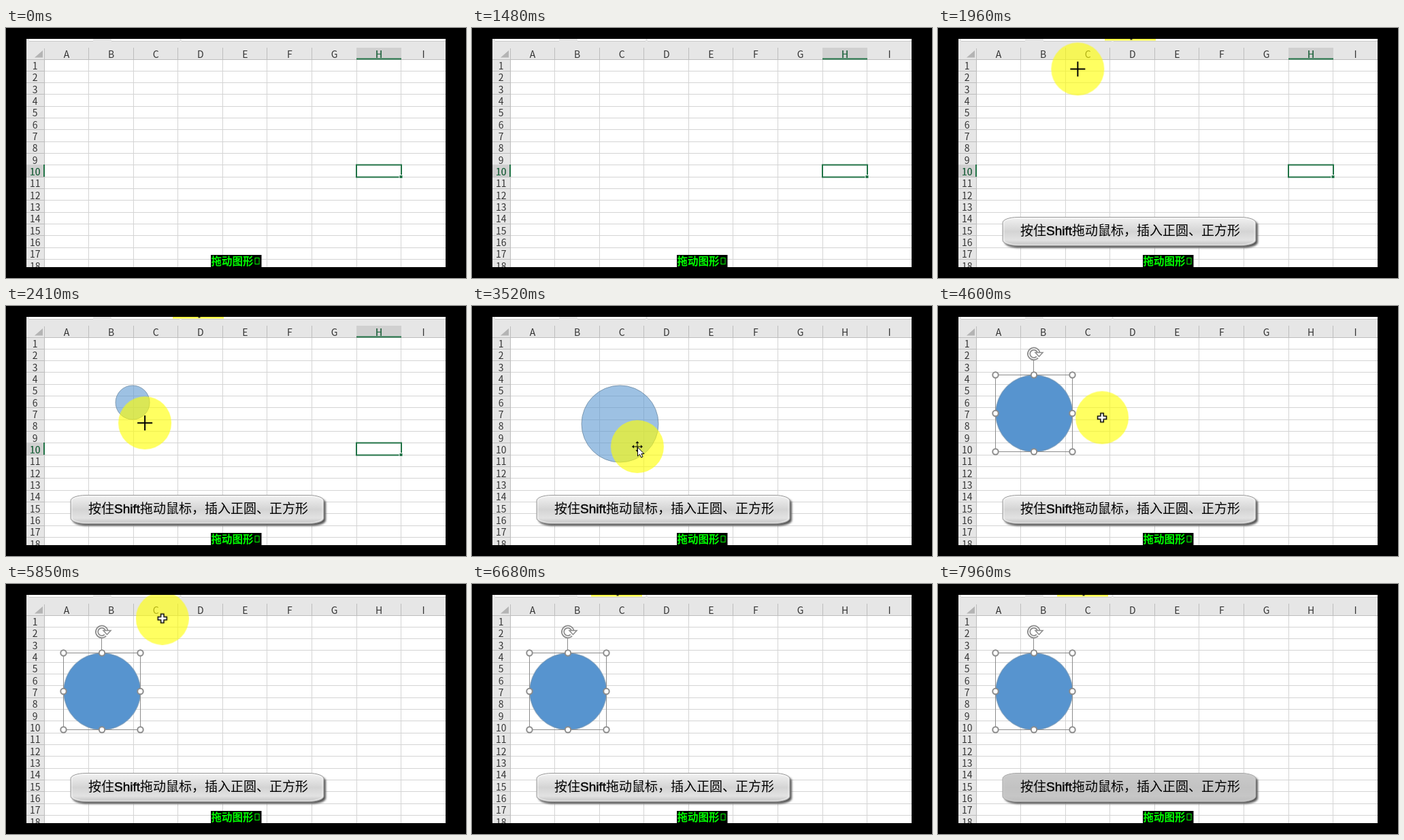
An HTML page that plays this animation: 676 px wide and 368 px high, repeating every 7.99 s.

```html
<!DOCTYPE html>
<html lang="zh">
<head>
<meta charset="utf-8">
<title>拖动图形</title>
<style>
  html, body { margin: 0; width: 100%; height: 100%; overflow: hidden; background: #000; }
  svg { display: block; width: 676px; height: 368px; }
  text { font-family: "Liberation Sans", "Noto Sans CJK SC", "Noto Sans CJK", sans-serif; }
  .label { font: 14px "Noto Sans CJK SC", "Noto Sans CJK", "Open Sans", sans-serif; fill: #333; text-anchor: middle; }
  .label.on { fill: #217346; }
  .note { font-size: 19px; font-weight: 300; }
  .note tspan { font-weight: 400; stroke: #000; stroke-width: .4px; }
</style>
</head>
<body>
<svg id="stage" viewBox="0 0 676 368">
  <defs>
    <clipPath id="window"><rect x="30" y="16" width="616" height="336"/></clipPath>
    <linearGradient id="silver" x1="0" y1="0" x2="0" y2="1">
      <stop offset="0" stop-color="#f2f2f2"/>
      <stop offset=".5" stop-color="#d4d4d4"/>
      <stop offset=".8" stop-color="#e2e2e2"/>
      <stop offset="1" stop-color="#c0c0c0"/>
    </linearGradient>
    <filter id="soft" x="-5%" y="-20%" width="110%" height="150%"><feGaussianBlur stdDeviation="1.5"/></filter>
  </defs>
</svg>
<script>
const LOOP = 7990;
const GREEN = '#217346';
const GRAY = '#8c8c8c';
const stage = document.getElementById('stage');

function add(parent, tag, attrs = {}, text) {
  const node = document.createElementNS('http://www.w3.org/2000/svg', tag);
  for (const key in attrs) node.setAttribute(key, attrs[key]);
  if (text) node.textContent = text;
  parent.append(node);
  return node;
}
const rect = (parent, x, y, width, height, fill, more) =>
  add(parent, 'rect', { x, y, width, height, fill, ...more });
const path = (parent, d, stroke, width = 1, fill = 'none') =>
  add(parent, 'path', { d, stroke, 'stroke-width': width, fill });

// Goes from one CSS state to another between two times and holds on both sides
function change(node, start, end, from, to, easing = 'linear') {
  const at = (time, state, ease) => ({ offset: time / LOOP, easing: ease, ...state });
  node.animate([at(0, from), at(start, from, easing), at(end, to), at(LOOP, to)],
    { duration: LOOP, iterations: Infinity });
}
// Visible only from one time to another, with soft or hard ends
function show(node, from, to, fadeIn = 0, fadeOut = 0) {
  const frames = [[0, from ? 0 : 1], [from, from ? 0 : 1], [from + fadeIn, 1],
    [to - fadeOut, 1], [to, to < LOOP ? 0 : 1], [LOOP, to < LOOP ? 0 : 1]];
  node.animate(frames.map(([time, opacity]) => ({ offset: time / LOOP, opacity })),
    { duration: LOOP, iterations: Infinity });
}

const win = add(stage, 'g', { 'clip-path': 'url(#window)' });
const colX = i => Math.floor(56 + 65.58 * i);
const rowY = i => Math.floor(46 + 17.33 * i);

const drawStart = 2190, drawEnd = 2860;
const grabTime = 3520, dropTime = 4130, selectTime = 4540;

function drawSheet() {
  rect(win, 30, 16, 616, 336, '#fff');
  rect(win, 30, 16, 616, 30, '#e6e6e6');
  rect(win, 30, 46, 26, 306, '#e6e6e6');
  for (const [from, to] of [[34, 128], [155, 255], [258, 646]]) {
    rect(win, from, 16, to - from, 3, '#fff');
    rect(win, from, 19, to - from, 1, '#c8c8c8');
  }
  let grid = '', heads = 'M30 46.5H646M56.5 30V352';
  for (let i = 1; i < 10; i++) {
    grid += `M${colX(i) + .5} 47V352`;
    heads += `M${colX(i) + .5} 29V46`;
  }
  for (let i = 1; i < 18; i++) {
    grid += `M57 ${rowY(i) + .5}H646`;
    heads += `M30 ${rowY(i) + .5}H56`;
  }
  path(win, grid, '#d4d4d4');
  path(win, heads, '#bdbdbd');
  path(win, 'M54 33V43.5H42Z', 'none', 0, '#b4b4b4');

  const active = add(win, 'g');
  const x = colX(7), y = rowY(9);
  rect(active, x, 29, 66, 16, '#d0d0d0');
  rect(active, x, 44.5, 66, 2, GREEN);
  rect(active, 30, y, 25, 18, '#d0d0d0');
  rect(active, 55, y, 2, 18, GREEN);
  rect(active, x, y + .5, 66, 18, 'none', { stroke: GREEN, 'stroke-width': 2 });
  rect(active, x + 63, y + 15.5, 5, 5, GREEN, { stroke: '#fff' });
  show(active, 0, 3360);

  const label = (x, y, text, selected) => {
    add(win, 'text', { x, y, class: 'label' }, text);
    if (selected) show(add(win, 'text', { x, y, class: 'label on' }, text), 0, 3360);
  };
  [...'ABCDEFGHI'].forEach((c, i) => label(89 + 65.58 * i, 44, c, c === 'H'));
  for (let i = 1; i <= 18; i++) label(42.7, 43.8 + 17.33 * i, String(i), i === 10);
}

// Shape gallery that drops down from the ribbon
function drawMenu() {
  const menu = add(win, 'g');
  rect(menu, 260.5, 10, 245, 350, '#fff', { stroke: '#c6c6c6' });
  const icons = ['M-5 -5L5 5', 'M-6 -4H6V4H-6Z', 'M-6 0A6 6 0 1 1 6 0A6 6 0 1 1 -6 0',
    'M0 -6L6 5H-6Z', 'M0 -6L6 0L0 6L-6 0Z', 'M-6 -2H1V-5L6 0L1 5V2H-6Z'];
  const sections = { 最近使用的形状: 3, 线条: 1, 矩形: 1, 基本形状: 4, 箭头总汇: 3 };
  let y = 16;
  for (const title in sections) {
    rect(menu, 261, y, 244, 19, '#f0f0f0');
    add(menu, 'text', { x: 266, y: y + 14, 'font-size': 11, 'font-weight': 700, fill: '#444' }, title);
    for (let i = 0; i < sections[title] * 12; i++) {
      const icon = path(menu, icons[i % icons.length], '#55606c');
      icon.setAttribute('transform', `translate(${273 + i % 12 * 19.8} ${y + 30 + Math.floor(i / 12) * 20})`);
    }
    y += 20 + sections[title] * 20;
  }
  show(menu, 60, 1480, 120);
}

function drawDisc() {
  const r = 56.5;
  const move = add(win, 'g');
  const disc = add(move, 'circle', { fill: '#5794cf', stroke: '#6f8ba3', 'stroke-width': .8 });
  const size = r => ({ cx: 161 + r + 'px', cy: 117 + r + 'px', r: r + 'px' });
  change(disc, drawStart + 30, drawEnd, size(0), size(r), 'ease-out');
  change(move, grabTime + 60, dropTime, { transform: 'none' }, { transform: 'translate(-76.3px, -15.3px)' });
  change(disc, dropTime, dropTime + 210, { fillOpacity: .58 }, { fillOpacity: 1 });
  show(disc, drawStart, LOOP);

  const frame = add(win, 'g');
  path(frame, 'M84.5 101.5H197.5V214.5H84.5ZM140.5 79V101', GRAY);
  for (let i = 0; i < 9; i++)
    if (i !== 4) add(frame, 'circle', {
      cx: 84.5 + r * (i % 3), cy: 101.5 + r * Math.floor(i / 3),
      r: 4.2, fill: '#fff', stroke: GRAY, 'stroke-width': 2
    });
  const turn = 'M146 75.5A7.3 7.3 0 1 1 148 69';
  path(frame, turn, GRAY, 5);
  path(frame, turn, '#fff', 1.5);
  path(frame, 'M143 68.5H154L148.5 74.5Z', GRAY, 1.5, '#fff');
  show(frame, selectTime, LOOP);
}

function drawPanel() {
  const panel = add(win, 'g');
  const plate = (fill, more) => rect(panel, 95, 278.5, 372, 42, fill, { rx: 22, ry: 8, ...more });
  plate('#555', { transform: 'translate(3 3)', filter: 'url(#soft)' });
  plate('url(#silver)', { stroke: '#999' });
  rect(panel, 97, 280, 368, 39, 'none', { rx: 21, ry: 7, stroke: '#fff', 'stroke-opacity': .6 });
  change(plate('#bdbdbd'), 7750, 7960, { opacity: 0 }, { opacity: .75 });
  const note = add(panel, 'text', { x: 121, y: 305, class: 'note' }, '按住');
  add(note, 'tspan', {}, 'Shift');
  note.append('拖动鼠标，插入正圆、正方形');
  show(panel, 1500, LOOP, 220);
}

function drawPointer() {
  const strip = (x, width, from, to) => {
    const g = add(win, 'g');
    rect(g, x, 16, width, 2.5, '#ffff48');
    rect(g, x + width / 2, 16, 3, 1.5, '#333');
    show(g, from, to);
  };
  strip(245, 75, 1800, 3360);
  strip(175, 75, 6650, LOOP);

  const pointer = add(win, 'g');
  add(pointer, 'circle', { r: 39, fill: '#ff0', 'fill-opacity': .62 });
  const thin = path(pointer, 'M-11 0H11M0 -11V11', '#000', 2);
  const arrow = add(pointer, 'g');
  path(arrow, 'M-6 0H6M0 -6V6', '#000');
  path(arrow, 'M-8 0L-5 -2.5V2.5ZM8 0L5 -2.5V2.5ZM0 -8L-2.5 -5H2.5ZM0 8L-2.5 5H2.5Z', 'none', 0, '#000');
  path(arrow, 'M.5 1V14L3.5 11.3L5.7 16L8 15L6 10.5H10Z', '#000', 1, '#fff');
  const plus = path(pointer, 'M-2.2 -6.5H2.2V-2.2H6.5V2.2H2.2V6.5H-2.2V2.2H-6.5V-2.2H-2.2Z', '#000', 1.5, '#fff');
  show(thin, 0, 3360);
  show(arrow, 3360, selectTime);
  show(plus, selectTime, LOOP);

  // Resting and turning points: time, x, y
  const stops = [
    [1750, 284, -40], [2080, 161, 117], [drawStart, 161, 117], [drawEnd, 250, 231], [3360, 250, 231],
    [grabTime, 243, 207], [dropTime, 174, 176], [4510, 174, 176], [4600, 241, 165], [4900, 270, -40],
    [5700, 270, -40], [6060, 174, 176], [6300, 198, 136], [6480, 198, 136], [6680, 213, -40]
  ];
  const place = ([time, x, y]) => ({
    offset: time / LOOP, transform: `translate(${x}px, ${y}px)`,
    easing: time === drawStart ? 'ease-out' : 'linear'
  });
  const [first, last] = [stops[0], stops[stops.length - 1]];
  pointer.animate([[0, first[1], first[2]], ...stops, [LOOP, last[1], last[2]]].map(place),
    { duration: LOOP, iterations: Infinity });
}

function drawCaption() {
  rect(win, 301, 334, 74.5, 18, '#000');
  add(win, 'text', { x: 301.5, y: 348.5, 'font-size': 15.5, 'font-weight': 700, fill: '#0f0' }, '拖动图形');
  rect(win, 366, 338.5, 6, 9, 'none', { stroke: '#0f0' });
}

drawSheet();
drawMenu();
drawDisc();
drawPanel();
drawPointer();
drawCaption();
</script>
</body>
</html>
```
